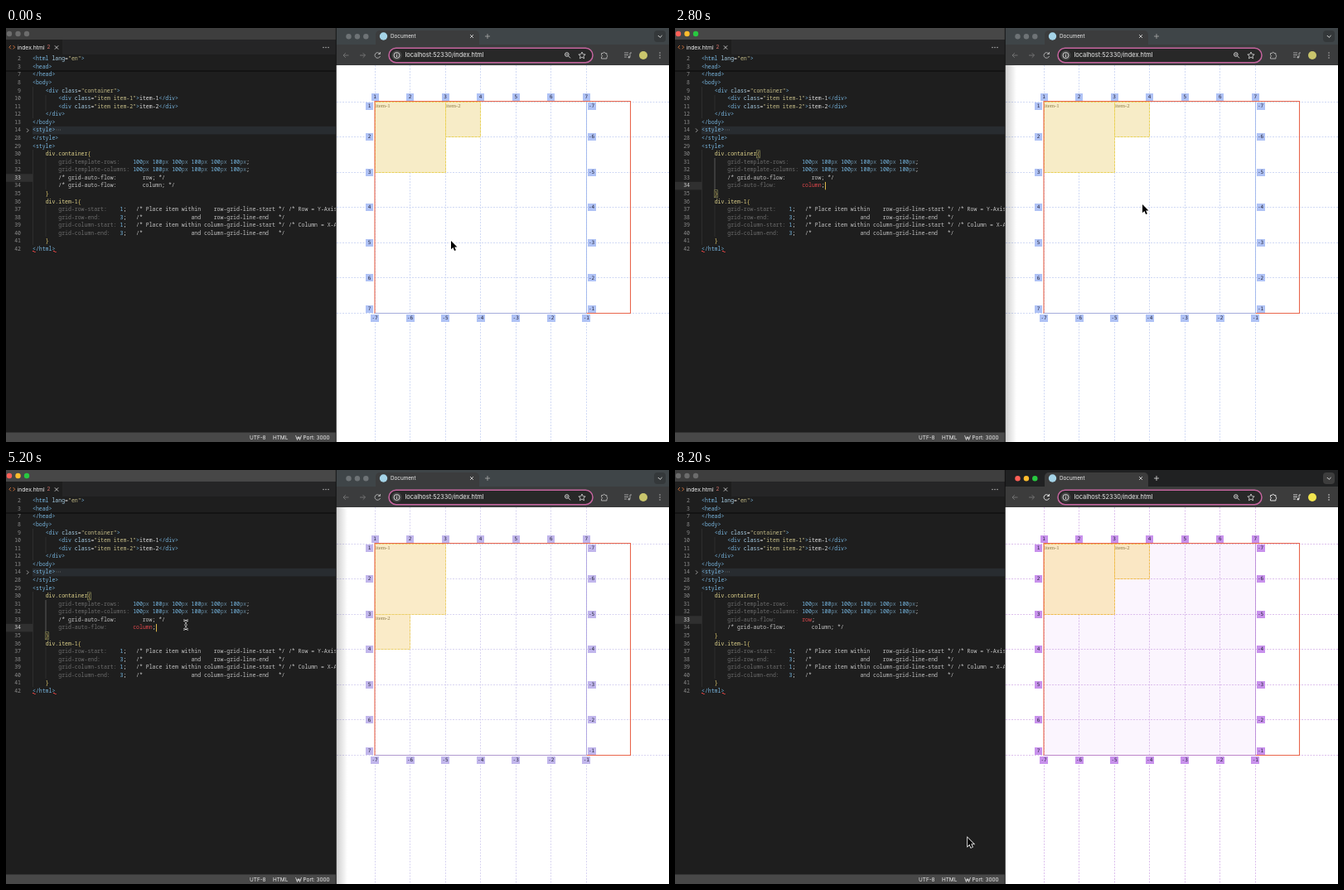
Animation of 800 by 500 pixels, one loop 8300 ms. Source, as an HTML page with a canvas:

```html
<!DOCTYPE html>
<html lang="en">
<head>
<meta charset="utf-8">
<title>Grid auto flow</title>
<style>
html, body { margin: 0; width: 100%; height: 100%; overflow: hidden; background: #1e1e1e; }
canvas { display: block; width: 800px; height: 500px; }
</style>
</head>
<body>
<canvas id="stage"></canvas>
<script>
const LOOP = 8300, CHAR = 3.91, LINE = 9.57, CELL = 42.55, GX = 445, GY = 89;
const MONO = '6.517px "Noto Sans Mono", monospace';
const ui = size => `${size}px Inter, sans-serif`;
const canvas = document.getElementById('stage'), c = canvas.getContext('2d');
const dpr = window.devicePixelRatio || 1;
canvas.width = 800 * dpr;
canvas.height = 500 * dpr;

const css = '        ';
const SIZES = '100px 100px 100px 100px 100px 100px;';
const flow = (value, on) => css + (on ? `grid-auto-flow:        ${value};` : `/* grid-auto-flow:        ${value}; */`);
const codeLines = s => [
  [2, '<html lang="en">'], [3, '<head>'], [7, '</head>'], [8, '<body>'],
  [9, '    <div class="container">'],
  [10, css + '<div class="item item-1">item-1</div>'],
  [11, css + '<div class="item item-2">item-2</div>'],
  [12, '    </div>'], [13, '</body>'], [14, '<style>'], [28, '</style>'], [29, '<style>'],
  [30, '    div.container{'],
  [31, css + 'grid-template-rows:    ' + SIZES],
  [32, css + 'grid-template-columns: ' + SIZES],
  [33, flow('row', s.rowOn)], [34, flow('column', s.columnOn)], [35, '    }'],
  [36, '    div.item-1{'],
  [37, css + 'grid-row-start:    1;   /* Place item within    row-grid-line-start */ /* Row = Y-Axis */'],
  [38, css + 'grid-row-end:      3;   /*               and    row-grid-line-end   */'],
  [39, css + 'grid-column-start: 1;   /* Place item within column-grid-line-start */ /* Column = X-Axis */'],
  [40, css + 'grid-column-end:   3;   /*               and column-grid-line-end   */'],
  [41, '    }'], [42, '</html>']
];

// Capture groups pair up with the colours below.
const TOKEN = /(\/\*.*?\*\/)|("[^"]*")|(<\/?\w*|>)|(\d+(?=px|;))|(px)|(grid-[\w-]+:)|(div\.[\w-]+)|(\b(?:row|column)(?=;))|(\b(?:class|lang)(?==))|([{}])|[^\s<>{}"]+/g;
const COLORS = ['#c4c4c4', '#c6bd88', '#76b3dc', '#77b9e4', '#65899f', '#6c6c6c', '#e0d48c', '#e0484c', '#a7cde4', '#e8d070'];

const PATH = [
  [0, 537, 257], [600, 537, 257], [1300, 216, 189], [2500, 216, 189], [2800, 564, 213],
  [3900, 564, 213], [4400, 217, 187], [5600, 217, 187], [5800, 190, 181], [6400, 190, 181],
  [7000, 549, 183], [7800, 549, 183], [8200, 353, 444], [LOOP, 353, 444]
];

const THEMES = [
  { line: '#c3cef2', edge: '#9eb5ec', label: '#afc2f5', fill: '#f7ecc7', border: '#ead256' },
  { line: '#cfc9ee', edge: '#aaa0df', label: '#c1b6ec', fill: '#faebc8', border: '#ecd06a' },
  { line: '#d4afe8', edge: '#b98ad8', label: '#c891ec', fill: '#fae7c4', border: '#f0bd4d', area: '#fbf5fe' }
];

function stateAt(t) {
  return {
    active: t < 1300 ? '' : t < 3000 ? 'editor' : t < 4600 ? 'browser' : t < 6900 ? 'editor' : 'browser',
    columnOn: t >= 1800 && t < 5300,
    rowOn: t >= 6000,
    line: t >= 1300 && t < 5700 ? 34 : 33,
    dirty: t >= 1800 && t < 2300 || t >= 5300 && t < 6600,
    theme: t < 3100 ? 0 : t < 6900 ? 1 : 2,
    typing: t >= 1700 && t < 2500 || t >= 5900 && t < 6400
  };
}

function rect(x, y, w, h, color) {
  c.fillStyle = color;
  c.fillRect(x, y, w, h);
}
function round(x, y, w, h, r, fill, stroke, width = 1) {
  c.beginPath();
  c.roundRect(x, y, w, h, r);
  if (fill) { c.fillStyle = fill; c.fill(); }
  if (stroke) { c.strokeStyle = stroke; c.lineWidth = width; c.stroke(); }
}
function disc(x, y, r, color) {
  c.fillStyle = color;
  c.beginPath();
  c.arc(x, y, r, 0, 7);
  c.fill();
}
function text(str, x, y, color, font, align = 'left') {
  c.font = font;
  c.fillStyle = color;
  c.textAlign = align;
  c.fillText(str, x, y);
}
function stroke(path, color, width = 1, dash = []) {
  c.strokeStyle = color;
  c.lineWidth = width;
  c.setLineDash(dash);
  c.stroke(new Path2D(path));
  c.setLineDash([]);
}
function windowDots(x, y, gap, on, off) {
  ['#ff5f57', '#febc2e', '#28c840'].forEach((color, i) => disc(x + i * gap, y, 3.2, on ? color : off));
}
const crisp = v => Math.floor(v) + .5;
const cross = (x, y, r, color) => stroke(`M${x - r} ${y - r}l${2 * r} ${2 * r}M${x + r} ${y - r}l${-2 * r} ${2 * r}`, color, .8);

function drawEditor(s) {
  const on = s.active === 'editor';
  c.save();
  c.beginPath();
  c.rect(0, 0, 398, 500);
  c.clip();
  rect(0, 0, 398, 500, '#1e1e1e');
  rect(0, 0, 398, 14, on ? '#474747' : '#3e3e3e');
  windowDots(4, 7, 10.5, on, '#6c6c6c');
  rect(68, 14, 330, 18, '#252526');
  if (s.dirty) rect(0, 14, 68, 1, '#2f7fb8');
  stroke('M6 21l-2.2 2.2 2.2 2.2M8.5 21l2.2 2.2-2.2 2.2', '#d9773d', .9);
  text('index.html', 13.5, 23.5, '#eee', ui(6.8));
  text('2', 49.5, 23.5, '#d7746c', ui(6.4));
  if (s.dirty) disc(61, 23.5, 2.3, '#eee');
  else cross(61, 23.5, 2.2, '#ddd');
  [383, 386, 389].forEach(x => disc(x, 23.5, .65, '#ccc'));

  const lines = codeLines(s);
  const yOf = n => 37.5 + LINE * lines.findIndex(l => l[0] === n);
  rect(32, yOf(14) - 4.8, 366, LINE, '#282c30');
  rect(0, yOf(s.line) - 4.8, 32, LINE, '#303030');
  rect(0, 51.5, 398, 1, '#080808');
  stroke('M32.5 71V109M32.5 147V262M48 81V100M48 157V195M48 214V252', '#343434', .7);
  const enclosed = on && (s.line === 34 ? s.columnOn : s.rowOn);
  if (enclosed) {
    stroke('M48 157V195', '#656565', .7);
    c.strokeStyle = '#898958';
    c.lineWidth = .7;
    c.strokeRect(32 + 17 * CHAR, yOf(30) - 4.5, CHAR, 9);
    c.strokeRect(32 + 4 * CHAR, yOf(35) - 4.5, CHAR, 9);
  }
  lines.forEach(([number, code], i) => {
    const y = 37.5 + i * LINE;
    text(number, 18, y, number === s.line ? '#d0d0d0' : '#8a8a8a', MONO, 'right');
    for (const m of code.matchAll(TOKEN)) {
      const kind = m.slice(1).findIndex(Boolean);
      text(m[0], 32 + m.index * CHAR, y, COLORS[kind] || '#dcdcdc', MONO);
    }
  });
  text('⋯', 60, yOf(14), '#888', MONO);
  stroke(`M25 ${yOf(14) - 2.2}l2.2 2.2-2.2 2.2`, '#bbb', .8);
  const squiggle = 'q.9-2 1.8 0t1.8 0';
  stroke(`M32 270${squiggle}M57 270${squiggle}`, '#f04848', 1);

  if (on) {
    const column = s.line === 34 ? (s.columnOn ? 38 : 42) : s.rowOn ? 35 : 39;
    rect(32.4 + column * CHAR, yOf(s.line) - 4.7, 1, 9.4, '#e0b84c');
  }
  rect(0, 488.5, 398, 12, '#484848');
  text('UTF-8', 294, 495, '#eee', ui(6.4));
  text('HTML', 322, 495, '#eee', ui(6.4));
  text('Port: 3000', 358.5, 495, '#eee', ui(6.4));
  stroke('M349.5 492l2 5.5 1.5-4 1.5 4 2-5.5M350.5 495h5', '#eee', .7);
  c.restore();
}

function drawChrome(s) {
  const on = s.active === 'browser', bar = on ? '#3c3c3c' : '#3b3c3d', ink = on ? '#ddd' : '#aaa';
  rect(398, 0, 402, 21, on ? '#202122' : '#3f4548');
  windowDots(413.5, 10.2, 10.4, on, '#6e7376');
  round(446, 3, 125, 22, 5, bar);
  rect(398, 20, 402, 25, bar);
  disc(455.5, 10, 4.7, '#a5d4e8');
  text('Document', 464, 10.3, '#eee', ui(6.3));
  cross(562, 10, 2, '#ddd');
  stroke('M578 10h6M581 7v6', ink, .8);
  round(782, 3, 14, 14, 4, on ? '#3d3d3d' : '#34383a');
  stroke('M786.8 9l2.4 2.4 2.4-2.4', '#ddd', 1);
  stroke('M413.5 33h-6.5m2.8-2.8l-2.8 2.8 2.8 2.8M427 33h6.5m-2.8-2.8l2.8 2.8-2.8 2.8', '#777', .9);
  stroke('M451 31a3.3 3.3 0 1 0 .5 3M451.5 29v2.5h-2.5', ink, 1);
  round(462, 24.2, 246, 17.5, 8.7, '#282828', '#c765a0', 1.5);
  disc(471.5, 33, 6, '#444');
  stroke('M468 33a3.5 3.5 0 1 0 7 0a3.5 3.5 0 1 0-7 0M471.5 32.5v2.5M471.5 30.7v.8', '#eee', .8);
  text('localhost:52330/index.html', 481.5, 33, '#eee', ui(7.4));
  stroke('M674.5 32a2.3 2.3 0 1 0 4.6 0a2.3 2.3 0 1 0-4.6 0M678.5 33.8l2.5 2.5M675.7 32h2.2', '#ddd', .9);
  stroke('M695 29l1.2 2.7 2.9.3-2.2 1.9.7 2.9-2.6-1.5-2.6 1.5.7-2.9-2.2-1.9 2.9-.3z', '#ddd', .8);
  stroke('M718.5 30.5h2a1.2 1.2 0 0 1 2.4 0h2v2.3a1.2 1.2 0 0 1 0 2.3v1.9h-6.4v-2a1.2 1.2 0 0 0 0-2.3z', ink, 1);
  stroke('M746 30h5M746 32.5h5M746 35h3M753 35v-5h2', ink, .9);
  disc(751.8, 35.2, 1.3, ink);
  disc(769, 33, 5, on ? '#f2e54f' : '#c9c56c');
  [30, 33, 36].forEach(y => disc(789, y, .8, ink));
}

function drawPage(s) {
  const th = THEMES[s.theme], end = GX + 6 * CELL, bottom = crisp(GY + 6 * CELL);
  rect(398, 45, 402, 455, '#fff');
  if (th.area) rect(GX, GY, 6 * CELL, 6 * CELL, th.area);
  for (let i = 0; i < 7; i++) {
    stroke(`M${crisp(GX + i * CELL)} 45V500M399 ${crisp(GY + i * CELL)}H800`, th.line, .8, [2, 1.5]);
  }
  const item = (col, row, span, name) => {
    const x = crisp(GX + col * CELL), y = crisp(GY + row * CELL);
    const right = crisp(GX + (col + span) * CELL), base = crisp(GY + (row + span) * CELL);
    rect(x, y, right - x, base - y, th.fill);
    text(name, x + .5, y + 4.3, '#8f7a45', '6.8px "Liberation Serif", serif');
    stroke(`M${x} ${y}H${right}V${base}H${x}z`, th.border, 1, [3, 1]);
  };
  item(0, 0, 2, 'item-1');
  if (s.theme === 1) item(0, 2, 1, 'item-2');
  else item(2, 0, 1, 'item-2');
  stroke(`M${GX} 88.5H753.5V${bottom}H${GX}z`, '#e9654c', 1.1);
  stroke(`M${GX} ${bottom}H${crisp(end)}V${GY}`, th.edge, .9);
  const label = (str, x, y) => {
    const w = str < 0 ? 10 : 9;
    rect(Math.round(x - w / 2), Math.round(y - 4.5), w, 9, th.label);
    text(str, x, y + .2, '#25253c', '6px "DejaVu Sans Mono", monospace', 'center');
  };
  for (let i = 0; i < 7; i++) {
    const x = GX + i * CELL, y = Math.min(339, Math.max(94, GY + i * CELL));
    label(i + 1, x, 83);
    label(i + 1, 438.5, y);
    label(i - 7, x, 350.5);
    label(i - 7, 706.5, y);
  }
  if (s.active === 'editor') {
    const shadow = c.createLinearGradient(398, 0, 412, 0);
    shadow.addColorStop(0, 'rgba(0,0,0,.2)');
    shadow.addColorStop(1, 'rgba(0,0,0,0)');
    rect(398, 45, 14, 455, shadow);
  }
}

function drawPointer(t, s) {
  if (s.typing) return;
  const k = PATH.findIndex((p, i) => i && t < p[0]);
  const [t0, x0, y0] = PATH[k - 1], [t1, x1, y1] = PATH[k];
  const u = (t - t0) / (t1 - t0), e = u * u * (3 - 2 * u);
  const x = x0 + (x1 - x0) * e, y = y0 + (y1 - y0) * e;
  c.save();
  c.translate(x, y);
  if (s.active === 'editor' && x < 398) {
    const beam = 'M-3-5.5q3 0 3 2.5q0-2.5 3-2.5M0-3V3M-3 5.5q3 0 3-2.5q0 2.5 3 2.5M-1.5 0h3';
    stroke(beam, '#fff', 2);
    stroke(beam, '#111', .9);
  } else {
    const arrow = new Path2D('M0 0V10.3L2.4 8.1 4.1 12 5.9 11.2 4.2 7.4H7.4z');
    c.lineWidth = 1.5;
    c.strokeStyle = '#fff';
    c.stroke(arrow);
    c.fillStyle = '#000';
    c.fill(arrow);
  }
  c.restore();
}

function frame() {
  const t = performance.now() % LOOP, s = stateAt(t);
  c.setTransform(dpr, 0, 0, dpr, 0, 0);
  c.textBaseline = 'middle';
  drawEditor(s);
  drawPage(s);
  drawChrome(s);
  rect(397.8, 0, .9, 500, '#111');
  drawPointer(t, s);
  requestAnimationFrame(frame);
}
frame();
</script>
</body>
</html>
```
